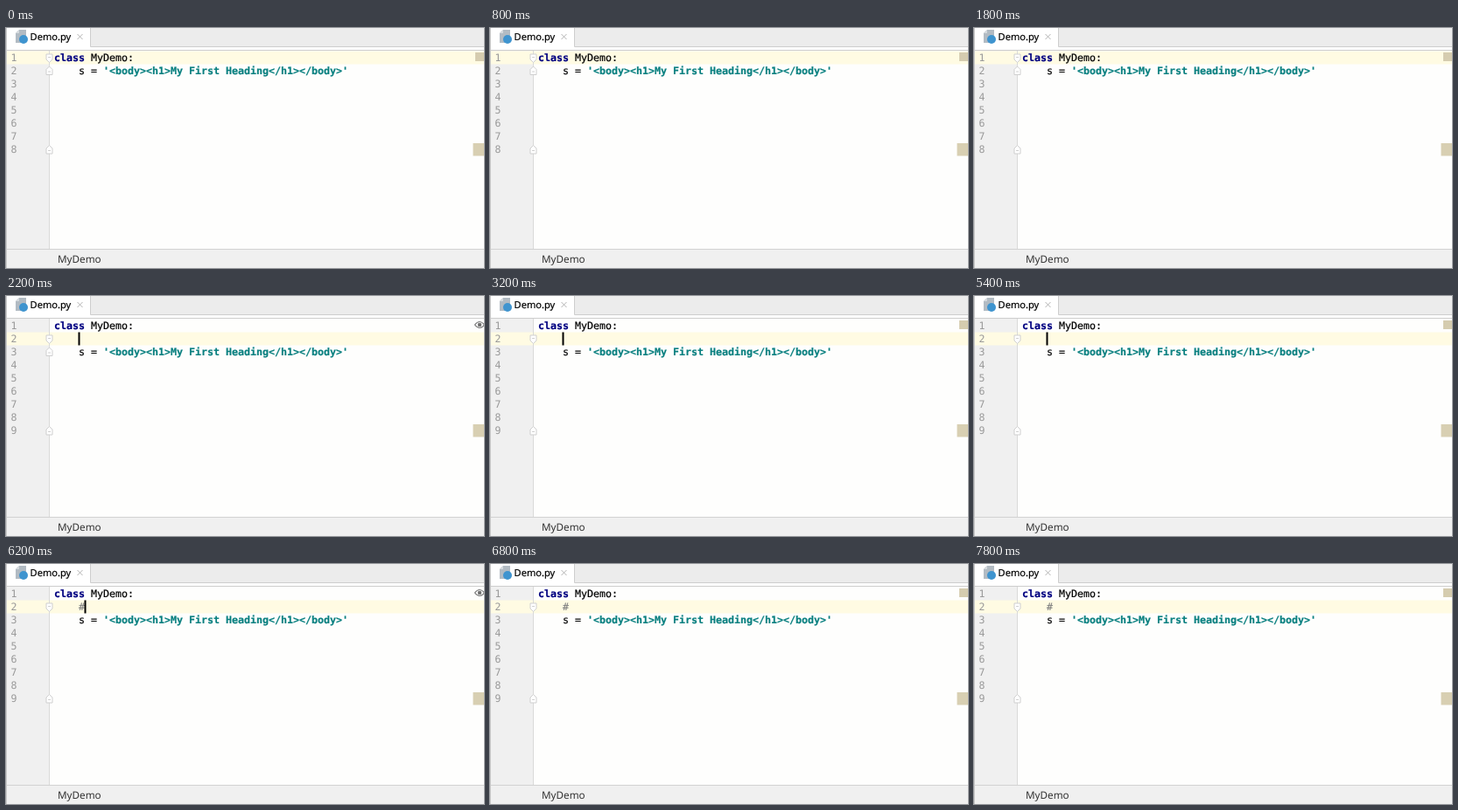
These frames come from a looping animation (546 by 275 pixels, 8 s). An HTML page:

```html
<!DOCTYPE html>
<html lang="en">
<head>
<meta charset="utf-8">
<title>Code editor</title>
<style>
html, body { margin: 0; width: 100%; height: 100%; overflow: hidden; background: #fefefd; }
svg { display: block; width: 546px; height: 275px; }
text { white-space: pre; text-rendering: geometricPrecision; }
.code { font: 11.63px "DejaVu Sans Mono", monospace; fill: #000; stroke: #000; stroke-width: .2px; }
.key { font-weight: bold; fill: #000080; stroke: #000080; }
.str { font-weight: bold; fill: #087f7f; stroke: #087f7f; }
.num { fill: #999; stroke: none; }
.note { fill: #808080; stroke: #808080; }
.ui { font-family: "Noto Sans", "Open Sans", sans-serif; fill: #333; }
.tab { fill: #000; stroke: #000; stroke-width: .2px; }
</style>
</head>
<body>
<svg viewBox="0 0 546 275">
  <defs>
    <g id="down"><path d="M-3.5-4.5h7v6l-3.5 3.5l-3.5-3.5z"/><path d="M-1.5-1h3"/></g>
    <g id="up"><path d="M-3.5 4.5h7v-6l-3.5-3.5l-3.5 3.5z"/><path d="M-1.5 1h3"/></g>
  </defs>

  <!-- tab bar -->
  <rect width="546" height="25" fill="#fff"/>
  <rect x="96" width="450" height="21" fill="#ececec"/>
  <path d="M96.5 0V21.5H546M0 25.5H546" fill="none" stroke="#cdcdcd"/>
  <path d="M15 2h8v15h-12v-11z" fill="#b2bbc3"/>
  <path d="M11 6l4-4v4z" fill="#d5dade"/>
  <circle cx="20" cy="13" r="5" fill="#3f94cf"/>
  <text class="ui tab" x="27.6" y="14" font-size="11.1">Demo.py</text>
  <path d="M81.5 7l6 6m0-6l-6 6" stroke="#b4b4b4"/>

  <!-- editor -->
  <rect y="26" width="49" height="227" fill="#f0f0f0"/>
  <rect id="row" width="546" height="15" fill="#fffbe3"/>
  <path d="M49.5 26V253" stroke="#d9d9d9"/>
  <g id="numbers" class="code num"></g>
  <g fill="#fff" stroke="#cfcfcf">
    <use id="foldTop" href="#down"/>
    <use id="foldText" href="#up"/>
    <use id="foldEnd" href="#up"/>
  </g>
  <text class="code" x="55" y="38"><tspan class="key">class</tspan> MyDemo:</text>
  <text id="hash" class="code note" x="83" y="53">#</text>
  <text id="body" class="code" x="83">s = <tspan class="str">'&lt;body&gt;&lt;h1&gt;My First Heading&lt;/h1&gt;&lt;/body&gt;'</tspan></text>
  <rect id="caret" width="2" height="15" fill="#000"/>

  <!-- marker strip -->
  <rect id="status" x="536" y="28" width="10" height="10" fill="#d5ccaf"/>
  <g id="eye" fill="none" stroke="#777" stroke-width="1.2">
    <path d="M535.5 33q5.5-7 11 0q-5.5 7-11 0z" fill="#fff"/>
    <circle cx="541" cy="33" r="1.7" fill="#666"/>
  </g>
  <rect id="warning" x="533.5" width="12.5" height="14.5" fill="#d8cfb2"/>

  <!-- breadcrumbs -->
  <rect y="253" width="546" height="22" fill="#f0f0f0"/>
  <path d="M0 253.5H546" stroke="#d2d2d2"/>
  <text class="ui" x="59" y="269" font-size="11.7">MyDemo</text>
  <path d="M.5 0V275" stroke="#c9c9c9"/>
</svg>
<script>
const LOOP = 8000, LINE = 15, CHAR = 7;
const NEWLINE = 2200, HASH = 6000, SPACE = 7000, REPARSED = 3200;
const caretOn = [[200, 800], [1200, 1800], [2200, 2600], [3200, 3800],
  [4200, 4800], [5200, 5800], [6000, 6800], [7000, 7800]];

const $ = id => document.getElementById(id);
const set = (id, name, value) => $(id).setAttribute(name, value);
const show = (id, on) => set(id, "visibility", on ? "visible" : "hidden");
const moveFold = (id, y) => set(id, "transform", `translate(49.5 ${y})`);

for (let n = 1; n <= 9; n++) {
  $("numbers").insertAdjacentHTML("beforeend",
    `<text id="n${n}" x="5.5" y="${23 + n * LINE}">${n}</text>`);
}

function draw(t) {
  const split = t >= NEWLINE;
  const shift = split ? LINE : 0;
  const column = !split ? 13 : 4 + (t >= HASH) + (t >= SPACE);
  const analysing = [NEWLINE, HASH, SPACE].some(s => t >= s && t < s + 400);

  set("row", "y", 26.5 + shift);
  set("body", "y", 53 + shift);
  set("warning", "y", 132 + shift);
  moveFold("foldTop", 34.5 + shift);
  moveFold("foldText", 49 + shift);
  moveFold("foldEnd", 139.5 + shift);
  show("n9", split);
  show("foldText", t < REPARSED);
  show("hash", t >= HASH);
  set("caret", "x", 54.5 + column * CHAR);
  set("caret", "y", 26.5 + shift);
  show("caret", caretOn.some(([a, b]) => t >= a && t < b));
  show("eye", analysing);
  show("status", !analysing);
}

const start = performance.now();
function tick() {
  draw((performance.now() - start) % LOOP);
  requestAnimationFrame(tick);
}
tick();
</script>
</body>
</html>
```
